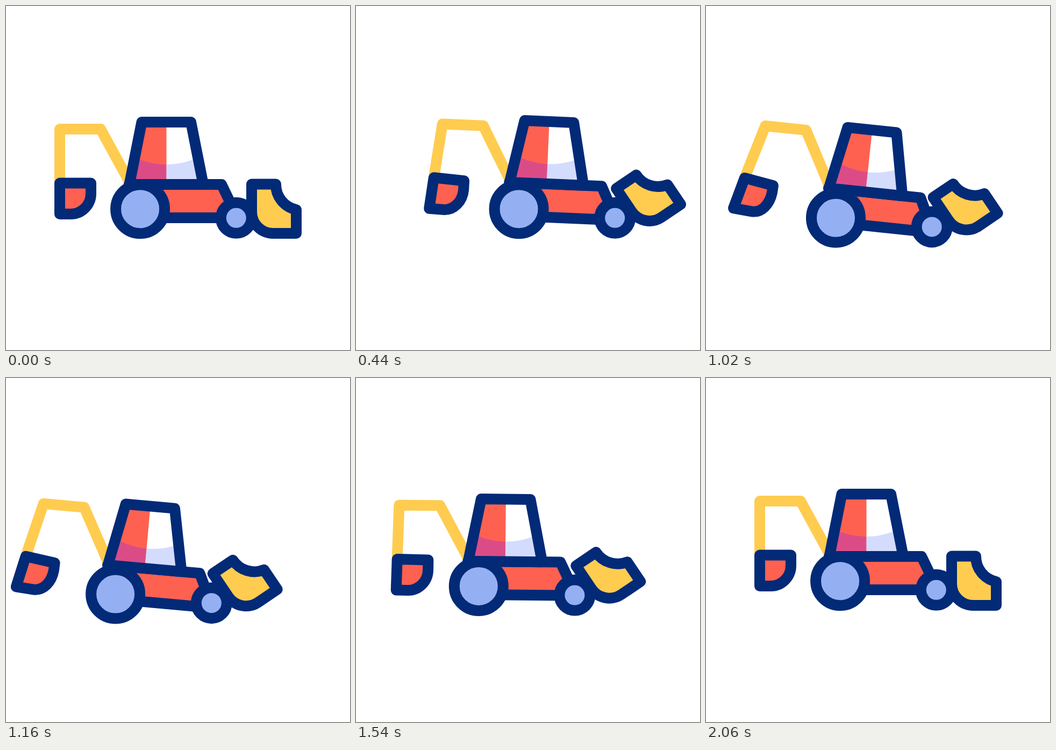
Write an HTML page that moves like this. It is 640 by 640 pixels and loops after 3.6 s.

```html
<!DOCTYPE html>
<html lang="en">
<head>
<meta charset="utf-8">
<title>Backhoe loader</title>
<style>
  html, body { margin: 0; width: 100%; height: 100%; overflow: hidden; background: #fff; }
  svg { display: block; width: 100%; height: 100%; }
  .line { stroke: #022a77; stroke-width: 20; stroke-linecap: round; stroke-linejoin: round; }
  .red { fill: #ff6151; }
  .yellow { fill: #ffcc50; }
  .blue { fill: #94b0f3; }
  .lilac { fill: #d3dcfd; }
  .pink { fill: #db4c87; }
  .arm { fill: none; stroke: #ffcc50; stroke-width: 20; stroke-linejoin: round; }
</style>
</head>
<body>
<svg viewBox="0 0 640 640">
  <g id="vehicle">
    <g id="body">
      <path id="arm" class="arm"/>
      <path id="scoop" class="line red"/>
      <path class="line red" d="M229 332H401L431 394H250Z"/>
      <path fill="#fff" d="M252.5 216H344L367 332H229.5Z"/>
      <path class="red" d="M252.5 216H298.5V332H229.5Z"/>
      <path class="pink" d="M239 282L247 285Q272.7 295 298.5 295V332H229.5Z"/>
      <path class="lilac" d="M358 282L350 285Q324.3 295 298.5 295V332H367Z"/>
      <path class="line" fill="none" d="M252.5 216H344L367 332H229.5Z"/>
    </g>
    <circle class="line blue" cx="249.6" cy="377.7" r="45.5"/>
    <circle class="line blue" cx="428.3" cy="394.3" r="28.5"/>
    <path id="loader" class="line yellow"
      d="M457 331.5H502A48 48 0 0 0 540 379V423H497A40 40 0 0 1 457 383Z"/>
  </g>
</svg>
<script>
  const LOOP = 3600;
  const [vehicle, body, arm, scoop, loader] =
    ['vehicle', 'body', 'arm', 'scoop', 'loader'].map(id => document.getElementById(id));

  // Keys are [time, value]; each stretch eases in and out.
  function track(keys, t) {
    const next = keys.findIndex(([time]) => time > t);
    if (next < 0) return keys[keys.length - 1][1];
    const [t0, v0] = keys[next - 1], [t1, v1] = keys[next];
    const s = (t - t0) / (t1 - t0);
    return v0 + (v1 - v0) * s * s * (3 - 2 * s);
  }

  const driveX = [[0, 0], [668, 73], [1280, -59], [1720, 0]];
  const driveY = [[0, 0], [668, 0], [1280, 27], [1720, 0]];
  const tilt = [[0, 0], [1000, 1], [1667, 0]];
  const lift = [[0, 0], [400, -34], [1680, -34], [2060, 0]];

  // Scoop outline at rest and fully swung: two top corners, a curve, the last corner.
  const scoopRest = [[100, 329.5], [158, 329.5], [158, 349], [158, 370], [141, 387], [120.5, 387], [100, 387]];
  const scoopSwung = [[71.7, 329.5], [125.9, 338.1], [125.3, 351.2], [123, 372.5], [110.5, 391.5], [90.2, 390], [56.7, 387.6]];

  function draw(t) {
    const p = track(tilt, t);
    const [wrist, corner, c0, c1, c2, c3, heel] = scoopRest.map((point, i) =>
      point.map((v, axis) => v + (scoopSwung[i][axis] - v) * p));
    vehicle.setAttribute('transform', `translate(${track(driveX, t)} ${track(driveY, t)})`);
    body.setAttribute('transform', `rotate(${6 * p} 326 395)`);
    arm.setAttribute('d', `M${wrist}L100 229H176L230 328`);
    scoop.setAttribute('d', `M${wrist}L${corner}L${c0}C${c1} ${c2} ${c3}L${heel}Z`);
    loader.setAttribute('transform', `rotate(${track(lift, t)} 457 378.5)`);
  }

  const start = performance.now();
  function tick() {
    draw((performance.now() - start) % LOOP);
    requestAnimationFrame(tick);
  }
  tick();
</script>
</body>
</html>
```
